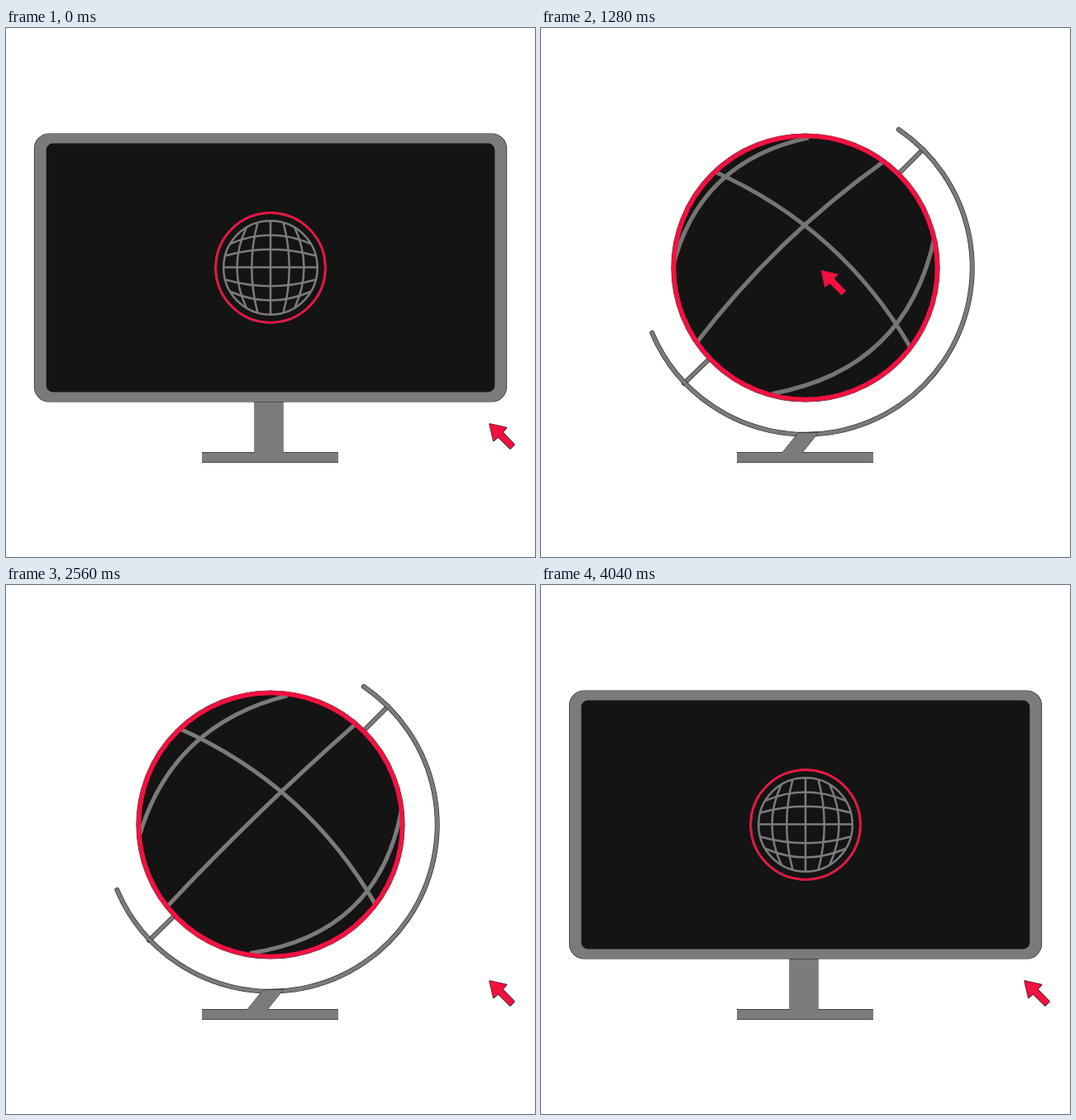
An HTML page with a canvas that plays this animation: 640 px wide and 640 px high, repeating every 5 s.

```html
<!DOCTYPE html>
<html lang="en">
<head>
<meta charset="utf-8">
<title>Monitor and globe</title>
<style>
html, body { margin: 0; width: 100%; height: 100%; overflow: hidden; background: #fff; }
canvas { display: block; width: 640px; height: 640px; }
</style>
</head>
<body>
<canvas id="stage" width="640" height="640"></canvas>
<script>
const ctx = document.getElementById('stage').getContext('2d');
const LOOP = 5000, STEP = 40, LAST = 4040;
const CX = 320, CY = 290;
const GREY = '#7b7b7b', DARK = '#141414', RED = '#f41140', SHINE = '#b8b8b8', EDGE = '#1c1c1c';
const RAD = Math.PI / 180;

// Bulge of a meridian against its phase
const SWEEP = [[0, -170], [0.236, -134.5], [1, -74], [1.236, -19.7], [2, 102], [2.236, 141], [2.6, 172]];

const mix = (a, b, p) => a + (b - a) * p;
const ease = (t, from, to) => {
  const s = Math.min(1, Math.max(0, (t - from) / (to - from)));
  return (1 - Math.cos(Math.PI * s)) / 2;
};
// Goes 0 to 1, stays, then returns to 0
const trip = (t, a, b, c, d) => ease(t, a, b) - ease(t, c, d);

function along(points, x) {
  for (let i = 1; i < points.length; i++) {
    const [x0, y0] = points[i - 1], [x1, y1] = points[i];
    if (x <= x1) return mix(y0, y1, (x - x0) / (x1 - x0));
  }
}

function polygon(points) {
  const path = new Path2D();
  points.forEach(([x, y], i) => i ? path.lineTo(x, y) : path.moveTo(x, y));
  path.closePath();
  return path;
}

function circle(r) {
  const path = new Path2D();
  path.arc(CX, CY, r, 0, 2 * Math.PI);
  return path;
}

function box(halfW, halfH, r) {
  const path = new Path2D();
  path.roundRect(CX - halfW, CY - halfH, 2 * halfW, 2 * halfH, r);
  return path;
}

function line(path, color, width) {
  ctx.strokeStyle = color;
  ctx.lineWidth = width;
  ctx.stroke(path);
}

function fill(path, color) {
  ctx.fillStyle = color;
  ctx.fill(path);
}

function edgedLine(path, color, width) {
  line(path, EDGE, width + 1.2);
  line(path, color, width);
}

function drawArm(arm, pin) {
  ctx.lineCap = 'round';
  if (pin > 0.001) {
    for (const [x0, y0, x1, y1] of [[462, 147, 432, 177], [173, 430, 205, 399]]) {
      const path = new Path2D();
      path.moveTo(x0, y0);
      path.lineTo(mix(x0, x1, pin), mix(y0, y1, pin));
      edgedLine(path, GREY, 4.3);
    }
  }
  if (arm > 0.001) {
    const path = new Path2D();
    path.arc(CX, CY, 201.7, mix(94, -56, arm) * RAD, mix(94, 157, arm) * RAD);
    edgedLine(path, GREY, 4.6);
  }
  ctx.lineCap = 'butt';
}

function drawStand(q) {
  const top = mix(450, 490, q);
  const neck = polygon([[mix(301, 311, q), top], [335, top], [mix(335, 315, q), 515], [mix(301, 291, q), 515]]);
  line(neck, EDGE, 1);
  fill(polygon([[237, 513], [402, 513], [402, 526], [237, 526]]), '#444');
  fill(polygon([[237, 514], [402, 514], [402, 525], [237, 525]]), GREY);
  fill(neck, GREY);
}

function drawIcon(scale) {
  if (scale < 0.01) return;
  ctx.save();
  ctx.translate(CX, CY);
  ctx.scale(scale, scale);
  const grid = new Path2D();
  const curve = (x0, y0, cx, cy, x1, y1) => {
    grid.moveTo(x0, y0);
    grid.quadraticCurveTo(cx, cy, x1, y1);
  };
  curve(-57, -0.5, 0, -0.5, 57, -0.5);
  curve(0, -57, 0, 0, 0, 57);
  for (const s of [-1, 1]) {
    curve(s * 15.5, -54.5, s * 30, 0, s * 15.5, 54.5);
    curve(s * 29, -49, s * 52, 0, s * 29, 49);
    curve(-54.5, s * 14.5, 0, s * 30, 54.5, s * 14.5);
    curve(-48.5, s * 29, 0, s * 50, 48.5, s * 29);
  }
  grid.moveTo(56.8, 0);
  grid.arc(0, 0, 56.8, 0, 2 * Math.PI);
  grid.moveTo(66.3, 0);
  grid.arc(0, 0, 66.3, 0, 2 * Math.PI);
  line(grid, GREY, 2.5);
  ctx.restore();
}

function drawShine(t) {
  const move = 0.85 * (t - 880);
  for (const [offset, width] of [[744, 11], [880, 36]]) {
    const c = offset + move, h = width / 2;
    fill(polygon([[c - h - 100, 100], [c + h - 100, 100], [c + h - 480, 480], [c - h - 480, 480]]), SHINE);
  }
}

// Tilted frame: x runs along the equator, y down the axis
function drawGlobe(t, alpha) {
  if (alpha < 0.01) return;
  ctx.save();
  ctx.clip(circle(159));
  ctx.globalAlpha = alpha;
  ctx.translate(CX, CY);
  ctx.rotate(45 * RAD);
  const path = new Path2D();
  path.moveTo(-161, -4);
  path.quadraticCurveTo(-1, -65, 160, -21);
  const phase = ((t - 1185) / 615 % 1 + 1) % 1;
  for (let k = 0; k < 3; k++) {
    const bulge = along(SWEEP, phase + k);
    if (bulge === undefined) continue;
    // Meridians meet the rim more steeply towards the sides
    const end = 0.55 * bulge - 5 + 8e-6 * bulge ** 3;
    const reach = Math.sqrt(159 * 159 - end * end);
    path.moveTo(end + 2.5, -reach);
    path.quadraticCurveTo(2 * bulge - end, 0, end - 2.5, reach);
  }
  line(path, GREY, 5);
  ctx.restore();
}

function drawCursor(p) {
  ctx.save();
  ctx.translate(585.3 - 250.5 * p, 479.2 - 189 * p);
  ctx.lineJoin = 'round';
  const arrow = polygon([[0, 0], [20, 4.6], [15.2, 10], [29.5, 24.7], [24.7, 29.5], [10, 15.2], [4.6, 20]]);
  line(arrow, EDGE, 2);
  line(arrow, RED, 0.8);
  fill(arrow, RED);
  ctx.restore();
}

function draw(t) {
  const morph = trip(t, 760, 1240, 3480, 3960);
  const stand = trip(t, 600, 1040, 3580, 4040);
  const arm = trip(t, 880, 1140, 3350, 3690);
  const pin = trip(t, 1080, 1260, 3360, 3500);
  const lines = trip(t, 1160, 1300, 3400, 3520);
  const cursor = trip(t, 470, 950, 1240, 1720) + trip(t, 2615, 3095, 3300, 3780);

  ctx.fillStyle = '#fff';
  ctx.fillRect(0, 0, 640, 640);
  drawArm(arm, pin);
  drawStand(stand);

  const halfW = mix(285.5, 162, morph);
  const frame = box(halfW, 162, mix(18, 162, morph));
  line(frame, EDGE, 1.2);
  fill(frame, GREY);
  const screen = box(halfW - mix(14.2, 2, morph), 162 - mix(11.6, 2.6, morph), mix(8, 159, morph));
  fill(screen, DARK);

  ctx.save();
  ctx.clip(screen);
  drawIcon(1 - morph);
  if (t > 0 && t < 1300) drawShine(t);
  ctx.restore();

  drawGlobe(t, lines);
  line(circle(mix(66.3, 159.4, morph)), RED, mix(2.7, 5.5, morph));
  drawCursor(cursor);
}

const start = performance.now();
function tick() {
  const t = (performance.now() - start) % LOOP;
  draw(Math.min(LAST, Math.floor(t / STEP) * STEP));
  requestAnimationFrame(tick);
}
tick();
</script>
</body>
</html>
```
